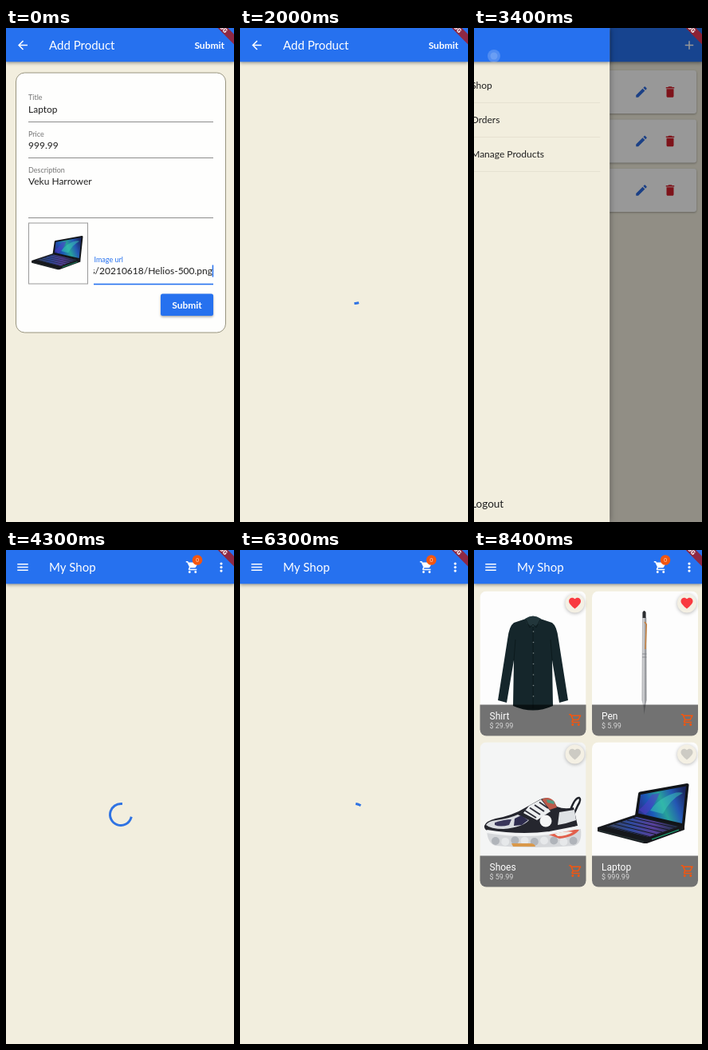
These frames come from a looping animation (286 px wide and 618 px high, 8.5 s). An HTML page with a canvas:

```html
<!DOCTYPE html>
<html lang="en">
<head>
<meta charset="utf-8">
<title>Shop app</title>
<style>
html, body { margin: 0; width: 100%; height: 100%; overflow: hidden; background: #f2eede; }
canvas { display: block; width: 100vw; height: 100vh; }
</style>
</head>
<body>
<canvas id="stage"></canvas>
<script>
const W = 286, H = 618, LOOP = 8500, STEP = 100;
const BLUE = '#2671ef', CREAM = '#f2eede', INK = '#202020', GREY = '#757575', ORANGE = '#f4560f';
const LATO = 'Lato, sans-serif', ROBOTO = 'Roboto, sans-serif';
const BAR = 42.3, MID = 21.6;
const dpr = window.devicePixelRatio || 1;

// Moments on the timeline, in ms
const SAVE = 840, POP = 2300, OPEN = 3282.5, PUSH = 3830, LOADED = 6620, ROUTE = 300;

const BACK = 'M20 11H7.83l5.59-5.59L12 4l-8 8 8 8 1.41-1.41L7.83 13H20v-2z';
const MENU = 'M3 18h18v-2H3zM3 13h18v-2H3zM3 6v2h18V6z';
const PLUS = 'M19 13h-6v6h-2v-6H5v-2h6V5h2v6h6z';
const EDIT = 'M3 17.25V21h3.75L17.81 9.94l-3.75-3.75zM20.71 7.04c.39-.39.39-1.02 0-1.41l-2.34-2.34c-.39-.39-1.02-.39-1.41 0l-1.83 1.83 3.75 3.75z';
const TRASH = 'M6 19c0 1.1.9 2 2 2h8c1.1 0 2-.9 2-2V7H6zM19 4h-3.5l-1-1h-5l-1 1H5v2h14z';
const HEART = 'M12 21.35l-1.45-1.32C5.4 15.36 2 12.28 2 8.5 2 5.42 4.42 3 7.5 3c1.74 0 3.41.81 4.5 2.09C13.09 3.81 14.76 3 16.5 3 19.58 3 22 5.42 22 8.5c0 3.78-3.4 6.86-8.55 11.54z';
const WHEELS = 'M7 18a2 2 0 1 0 .01 0zM17 18a2 2 0 1 0 .01 0z';
const CART = WHEELS + 'M1 2v2h2l3.6 7.59-1.35 2.45C4.5 15.4 5.5 17 7 17h12v-2H7.2l1.1-2h7.25c.75 0 1.41-.41 1.75-1.03l3.58-6.49C21.3 4.8 20.8 4 20 4H5.21l-.94-2z';
const CART_LINE = CART + 'M6.16 6l2.37 5h7.02l2.76-5z';
const BAG = 'M16 6V4c0-1.1-.9-2-2-2h-4c-1.1 0-2 .9-2 2v2H2v13c0 1.1.9 2 2 2h16c1.1 0 2-.9 2-2V6zM10 4h4v2h-4zM9 18V9l7.5 4z';
const CARD = 'M20 4H4c-1.1 0-2 .9-2 2v12c0 1.1.9 2 2 2h16c1.1 0 2-.9 2-2V6c0-1.1-.9-2-2-2zM20 18H4v-6h16zM20 8H4V6h16z';
const EXIT = 'M10.1 15.6L11.5 17l5-5-5-5-1.4 1.4L12.7 11H3v2h9.7zM19 3H5c-1.1 0-2 .9-2 2v4h2V5h14v14H5v-4H3v4c0 1.1.9 2 2 2h14c1.1 0 2-.9 2-2V5c0-1.1-.9-2-2-2z';

function makeContext(canvas) {
  canvas.width = Math.round(W * dpr);
  canvas.height = Math.round(H * dpr);
  const c = canvas.getContext('2d');
  c.scale(dpr, dpr);
  return c;
}
const screen = makeContext(document.getElementById('stage'));
const spare = makeContext(document.createElement('canvas'));
let g = screen;

// ---- easing ----
const clamp = v => Math.max(0, Math.min(1, v));

function bezier(x1, y1, x2, y2) {
  const at = (a, b, u) => 3 * a * u * (1 - u) ** 2 + 3 * b * u * u * (1 - u) + u ** 3;
  return x => {
    let lo = 0, hi = 1;
    for (let i = 0; i < 24; i++) {
      const mid = (lo + hi) / 2;
      if (at(x1, x2, mid) < x) lo = mid; else hi = mid;
    }
    return at(y1, y2, lo);
  };
}
const fastOutSlowIn = bezier(.4, 0, .2, 1);
const easeIn = bezier(.42, 0, 1, 1);

// Critically damped spring from 0 to 1
function spring(ms) {
  if (ms <= 0) return 0;
  const s = ms / 1000;
  return 1 - (1 + 21.36 * s) * Math.exp(-22.36 * s);
}

// ---- drawing helpers ----
function text(str, x, y, size, color, opt = {}) {
  g.font = `${opt.weight || 400} ${size}px ${opt.font || LATO}`;
  g.textAlign = opt.align || 'left';
  g.fillStyle = color;
  g.fillText(str, x, y);
}
function rect(x, y, w, h, color) {
  g.fillStyle = color;
  g.fillRect(x, y, w, h);
}
function round(x, y, w, h, r) {
  g.beginPath();
  g.roundRect(x, y, w, h, r);
}
function circle(x, y, r, color) {
  g.beginPath();
  g.arc(x, y, r, 0, 7);
  g.fillStyle = color;
  g.fill();
}
function shape(d, color) {
  g.fillStyle = color;
  g.fill(new Path2D(d));
}
function line(d, color, width) {
  g.strokeStyle = color;
  g.lineWidth = width;
  g.stroke(new Path2D(d));
}
function placed(x, y, scale, draw) {
  g.save();
  g.translate(x, y);
  g.scale(scale, scale);
  draw();
  g.restore();
}
function icon(d, cx, cy, color, size = 18) {
  placed(cx - size / 2, cy - size / 2, size / 24, () => {
    g.fillStyle = color;
    g.fill(new Path2D(d), 'evenodd');
  });
}
function shadowed(blur, dy, alpha, draw) {
  g.save();
  g.shadowColor = `rgba(0,0,0,${alpha})`;
  g.shadowBlur = blur * dpr;
  g.shadowOffsetY = dy * dpr;
  draw();
  g.restore();
}
function gradient(x1, y1, x2, y2, colors) {
  const fill = g.createLinearGradient(x1, y1, x2, y2);
  colors.forEach((c, i) => fill.addColorStop(i / (colors.length - 1), c));
  return fill;
}
function touch(x, y) {
  circle(x, y, 8, 'rgba(255,255,255,.2)');
  circle(x, y, 4.5, 'rgba(255,255,255,.15)');
}
// Page transition: slides up by a quarter of the stage while fading in
function routed(v, draw) {
  g = spare;
  g.clearRect(0, 0, W, H);
  draw();
  g = screen;
  g.save();
  g.globalAlpha = easeIn(v);
  g.drawImage(spare.canvas, 0, (1 - fastOutSlowIn(v)) * H / 4, W, H);
  g.restore();
}

// ---- product pictures ----
function shirt() {
  shape('M20 9Q14 13 12 30L0 106L11 109L20 56L19 113Q44 124 69 113L68 56L77 109L88 106L76 30Q74 13 68 9L53 4Q44-2 35 4z', '#15262b');
  shape('M34 4Q44-3 54 4L52 10L44 14L36 10z', '#22363b');
  line('M35 5L40 15L44 11L48 15L53 5M44 14V116M20 56L22 30M68 56L66 30', '#0b171a', .8);
  for (let i = 0; i < 7; i++) circle(44.5, 20 + i * 13.5, .8, '#7e8a8c');
}
function pen() {
  shape('M1 9Q3.5 6 6.2 9L6.4 112L4.4 122L3.6 130L2.8 122L.6 112z',
    gradient(0, 0, 7, 0, ['#85878b', '#d4d5d8', '#a3a5a9', '#6a6d72']));
  shape('M1.400 9V2Q3.5-2 5.6 2V9z', '#2c2e31');
  line('M1 54H6.4M1 58H6.4', '#7d7f83', .8);
  line('M4 14L6.300 17L5 48', '#c8823f', 1.5);
}
function laptop() {
  shape('M2 55L50 39L111 53V58L64 75L60 75L2 60z', '#16181c');
  shape('M13 54L51 42L103 54L66 67z', gradient(15, 55, 100, 55, ['#38435c', '#2f4a9c', '#57409a', '#22314a']));
  for (let i = 0; i < 5; i++) line(`M${15 + i * 8} ${53.500 - i * 2.5}L${67 + i * 8} ${66.5 - i * 2.8}`, '#15181e', 1);
  shape('M53 13Q53 11 55 10.500L114 0Q117 0 116.500 2.500L111 54L49 40z', '#111418');
  shape('M56 14L113 3.500L108 50L53 37.500z', gradient(53, 35, 112, 12, ['#2b2d88', '#1b59b8', '#27a39a', '#2458b4', '#1a275e']));
  shape('M68 34Q75 23 87 17Q101 9 109 12Q93 20 84 38z', 'rgba(60,205,185,.5)');
  shape('M54 33Q64 25 70 14L80 12Q73 29 62 39z', 'rgba(80,60,200,.55)');
  line('M70 70L104 58', '#1fae7c', 1.3);
  line('M4 59L60 73', '#30403f', .8);
}
function shoe() {
  line('M108 18Q114 2 119 3Q122 5 117 13L112 24', '#20232a', 2.5);
  shape('M3 44Q4 60 14 63Q60 67 113 63Q123 60 121 42z', '#d5d7da');
  for (let i = 0; i < 9; i++) circle(14 + i * 12.2, 57 + Math.sin(i * 2), 5, i % 2 ? '#e6e8ea' : '#b0b4ba');
  shape('M34 60H58Q63 60 64 64H36z', '#d9984a');
  shape('M78 48Q100 41 119 43Q113 52 94 54z', '#e2604c');
  shape('M88 48Q104 44 111 46Q103 51 92 51z', '#f0efe9');
  shape('M0 38Q2 32 14 29Q36 25 52 15L70 5Q80 1 87 8L91 14Q101 18 112 15L117 38Q100 43 82 47Q40 50 6 45Q-1 43 0 38z', '#25262e');
  shape('M2 37Q5 32 15 31Q31 29 42 24L56 31Q48 40 24 42Q8 42 2 37z', '#d9dce0');
  shape('M13 34Q25 30 34 30L31 37Q20 40 13 37z', '#39365a');
  shape('M38 29L46 25L55 31L47 37L37 38z', '#2e2c4e');
  shape('M56 13L71 5L83 20L66 31L49 22z', '#eceef0');
  shape('M72 5Q81 0 88 8L91 15L82 18z', '#bd5a4a');
  shape('M78 5L87 7L88 11L79 9z', '#519b83');
  shape('M94 21L113 18L115 31Q104 35 92 37z', '#dfe2e5');
  for (let i = 0; i < 4; i++) line(`M${51 + i * 6} ${19 - i * 3.5}L${65 + i * 5} ${28 - i * 4}`, '#2d2e39', 2);
  circle(77, 32, 7.5, '#f5f6f7');
  line('M3 45Q45 52 82 47L118 40', '#f2f3f4', 4);
}

const pics = {
  shirt: { draw: shirt, x: 30, y: 82, back: '#fdfdfd' },
  pen: { draw: pen, x: 210, y: 76, back: '#fdfdfd' },
  shoe: { draw: shoe, x: 13, y: 307, back: '#f4f5f5' },
  laptop: { draw: laptop, x: 153, y: 292, back: '#fdfdfd' }
};

// ---- shared parts ----
function page(title, lead) {
  rect(0, 0, W, H, CREAM);
  bar(W);
  icon(lead, 21, MID, '#fff');
  text(title, 54, 27, 15, '#fff');
}
function bar(width) {
  shadowed(4, 1.5, .35, () => rect(0, 0, width, BAR, BLUE));
}
function spinner(ms) {
  const path = (ms % 1333) / 1333, turn = (ms % 2222) / 2222;
  const head = fastOutSlowIn(clamp(path * 2)) * 1.5 * Math.PI;
  const tail = fastOutSlowIn(clamp(path * 2 - 1)) * 1.5 * Math.PI;
  const start = -Math.PI / 2 + tail + turn * 2 * Math.PI + path * Math.PI / 2;
  g.save();
  g.beginPath();
  g.arc(144, 331, 13.5, start, start + Math.max(head - tail, .001));
  g.strokeStyle = '#2f73e3';
  g.lineWidth = 3;
  g.lineCap = 'square';
  g.stroke();
  g.restore();
}
function banner() {
  g.save();
  g.translate(W, -22);
  g.rotate(Math.PI / 4);
  rect(-30, 21, 60, 9, 'rgba(160,28,40,.86)');
  text('DEBUG', 0, 28.2, 7.65, '#fff', { weight: 900, font: ROBOTO, align: 'center' });
  g.restore();
}

// ---- screens ----
function field(label, value, y, underline) {
  text(label, 28, y, 9, GREY);
  text(value, 28, y + 15.5, 12, INK);
  rect(28, underline, 232, 1, '#8d8d8d');
}
function form(t) {
  round(12.5, 56, 263, 325, 11);
  g.fillStyle = '#fefefd';
  g.fill();
  g.strokeStyle = '#98947f';
  g.lineWidth = 1;
  g.stroke();
  field('Title', 'Laptop', 90, 117);
  field('Price', '999.99', 135.5, 162);
  field('Description', 'Veku Harrower', 180.8, 237);

  g.strokeStyle = '#9a9a9a';
  g.strokeRect(28.5, 244, 74, 76);
  placed(31, 260, .562, laptop);

  text('Image url', 110.5, 293, 9, BLUE);
  g.save();
  g.beginPath();
  g.rect(110, 294, 150, 20);
  g.clip();
  text('s/20210618/Helios-500.png', 259, 308, 12, INK, { align: 'right' });
  g.restore();
  if (t % 1000 < 500) rect(258.7, 296.5, 1.5, 15, BLUE);
  rect(110, 319.7, 150, 1.6, BLUE);

  shadowed(3, 1.5, .35, () => {
    round(194, 332.5, 66, 27.5, 2.5);
    g.fillStyle = BLUE;
    g.fill();
  });
  text('Submit', 227, 351, 12, '#fff', { weight: 700, align: 'center' });
}
function addPage(t) {
  page('Add Product', BACK);
  text('Submit', 274, 26, 12, '#fff', { weight: 700, align: 'right' });
  if (t < SAVE) form(t); else spinner(t - SAVE);
  if (t >= 700 && t < 900) touch(254, MID);
}

function row(i, name, price, pic, scale, thumbX, thumbY, back) {
  const top = 53 + i * 61.5, mid = top + 27;
  shadowed(2.5, 1, .3, () => {
    round(9.5, top, 269.5, 54, 3);
    g.fillStyle = '#fefefe';
    g.fill();
  });
  circle(36, mid, 15, '#f3f3f3');
  g.save();
  g.beginPath();
  g.arc(36, mid, 14.5, 0, 7);
  g.clip();
  rect(20, mid - 16, 32, 32, back);
  placed(thumbX, mid + thumbY, scale, pic.draw);
  g.restore();
  text(name, 63, top + 24, 12, INK);
  text('Price: $ ' + price, 63, top + 39.5, 10.5, '#808080');
  icon(EDIT, 210, mid, '#2d6be0');
  icon(TRASH, 246, mid, '#d2202b');
}
function productsPage() {
  page('Your Products', MENU);
  icon(PLUS, 270, MID, '#fff');
  row(0, 'Shirt', '29.99', pics.shirt, .25, 25, -14.5, '#fefefe');
  row(1, 'Pen', '5.99', pics.pen, .23, 35.3, -15, '#fefefe');
  row(2, 'Laptop', '999.99', pics.laptop, .3, 17, -11, '#101c45');
}

function drawer(v) {
  rect(0, 0, W, H, `rgba(0,0,0,${.54 * v})`);
  g.save();
  g.translate((v - 1) * 228, 0);
  shadowed(8, 0, .4, () => rect(0, 0, 228, H, CREAM));
  bar(228);
  [['Shop', BAG], ['Orders', CARD], ['Manage Products', EDIT]].forEach(([name, d], i) => {
    const y = 72 + i * 43;
    icon(d, 21, y, GREY);
    text(name, 54, y + 4, 12, INK);
    rect(12, y + 21, 204, .8, '#e4dfcf');
  });
  icon(EXIT, 21, 595, GREY);
  text('Logout', 54, 600, 13.5, INK);
  g.restore();
}

function tile(x, y, name, price, liked, pic, shown) {
  g.save();
  round(x, y, 133, 181, 8);
  g.clip();
  rect(x, y, 133, 181, pic.back);
  g.globalAlpha *= shown;
  placed(pic.x, pic.y, 1, pic.draw);
  g.restore();

  round(x, y + 142, 133, 39, [0, 0, 8, 8]);
  g.fillStyle = 'rgba(0,0,0,.55)';
  g.fill();
  text(name, x + 12, y + 160, 12, '#fff', { font: ROBOTO });
  text('$ ' + price, x + 12, y + 171.5, 9, '#d8d8d8', { font: ROBOTO });
  icon(CART_LINE, x + 120, y + 161, ORANGE);
  shadowed(4, 1, .28, () => circle(x + 119, y + 15, 12, '#f4f0e4'));
  icon(HEART, x + 119, y + 15, liked ? '#f93a40' : '#cdcbc4');
}
function shopPage(t) {
  page('My Shop', MENU);
  icon(CART, 234, MID, '#fff');
  circle(240, 12.5, 6.3, ORANGE);
  text('0', 240, 15.3, 7.5, '#ffd0b4', { font: ROBOTO, align: 'center' });
  for (const dy of [-4.5, 0, 4.5]) circle(270, MID + dy, 1.6, '#fff');
  if (t < LOADED) {
    spinner(t - PUSH);
    return;
  }
  const shown = clamp((t - LOADED) / 400);
  tile(7.5, 51.5, 'Shirt', '29.99', true, pics.shirt, shown);
  tile(148, 51.5, 'Pen', '5.99', true, pics.pen, shown);
  tile(7.5, 240.5, 'Shoes', '59.99', false, pics.shoe, shown);
  tile(148, 240.5, 'Laptop', '999.99', false, pics.laptop, shown);
}

function draw(t) {
  if (t < POP) addPage(t);
  else if (t < PUSH + ROUTE) {
    productsPage();
    if (t < POP + ROUTE) routed(1 - (t - POP) / ROUTE, () => addPage(t));
    if (t > OPEN) drawer(spring(t - OPEN));
    if (t >= 3200 && t < 3500) touch(25, 35);
    if (t >= 3700 && t < 3900) circle(70, 72, 8, 'rgba(120,120,120,.25)');
    if (t >= PUSH) routed((t - PUSH) / ROUTE, () => shopPage(t));
  } else shopPage(t);
  banner();
}

const began = performance.now();
function tick() {
  const t = Math.floor((performance.now() - began + 16) / STEP) * STEP % LOOP;
  g = screen;
  draw(t);
  requestAnimationFrame(tick);
}
tick();
</script>
</body>
</html>
```
